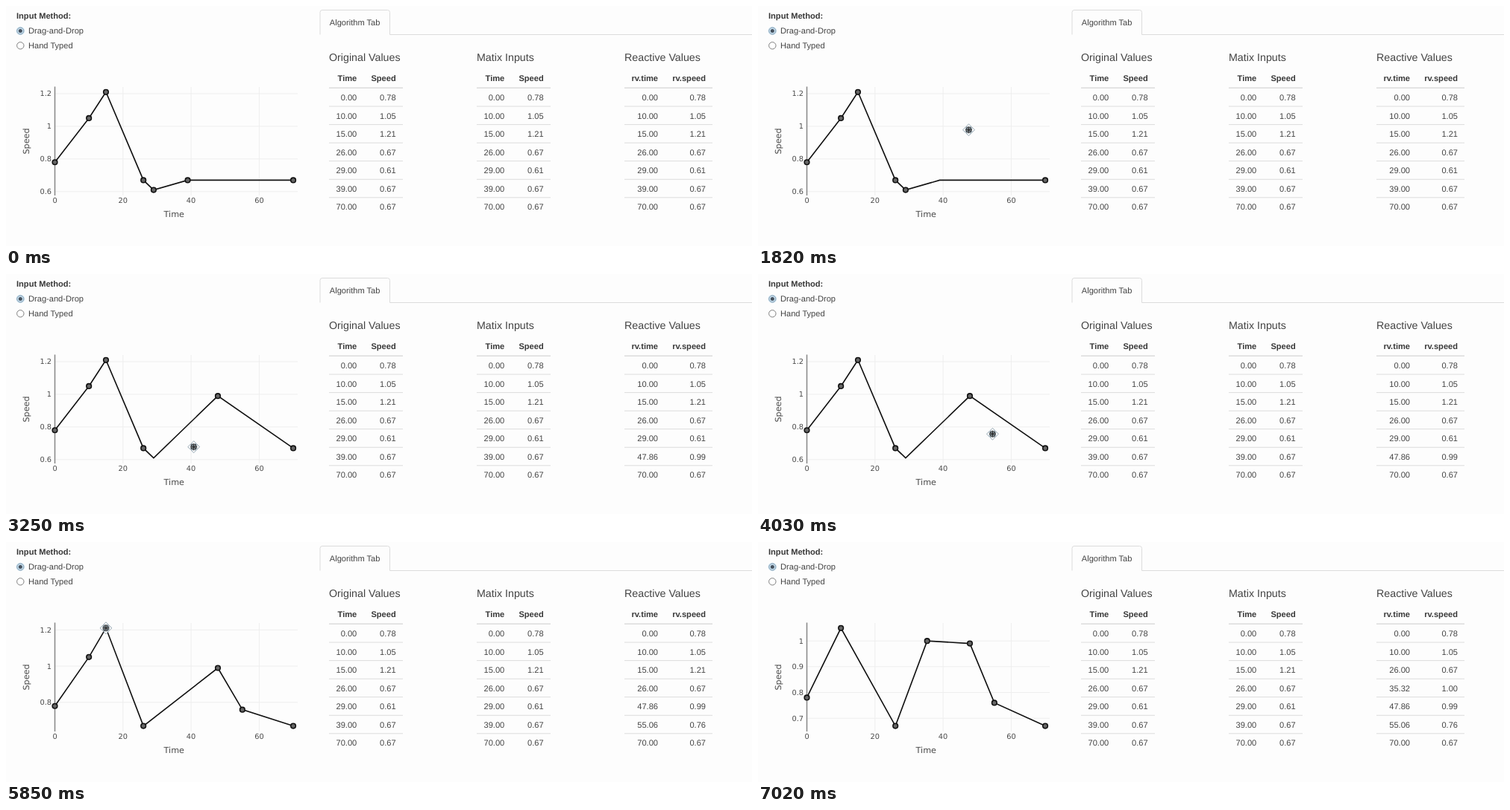
Animation, 1000 px wide and 323 px high, one loop 7930 ms. Source, as an HTML page:

```html
<!DOCTYPE html>
<html lang="en">
<head>
<meta charset="utf-8">
<title>Drag-and-drop chart</title>
<style>
  html, body { margin: 0; width: 100%; height: 100%; overflow: hidden; background: #fdfdfd; }
  svg { display: block; width: 100%; height: 100%; }
  text { font: 11.1px "Liberation Sans", Arial, sans-serif; fill: #444; text-rendering: geometricPrecision; }
  .b { font-weight: bold; fill: #383838; }
  .h { font-size: 14.25px; }
  .end { text-anchor: end; }
  .mid { text-anchor: middle; }
  .axis { font: 11.2px "DejaVu Sans", Verdana, sans-serif; fill: #4a4a4a; }
  .tick { font-size: 9.8px; }
  .rule { stroke: #dcdcdc; fill: none; }
  .grid { stroke: #eee; }
  .zero { stroke: #8c8c8c; stroke-width: 1.6; }
  .line { stroke: #111; stroke-width: 1.6; fill: none; }
  .dot { fill: #666; stroke: #111; stroke-width: 1.6; }
</style>
</head>
<body>
<svg viewBox="0 0 1000 323" id="stage"></svg>
<script>
const LOOP = 7930, STEP = 130;
const stage = document.getElementById('stage');

function add(parent, name, attrs = {}, text) {
  const node = document.createElementNS('http://www.w3.org/2000/svg', name);
  for (const key in attrs) node.setAttribute(key, attrs[key]);
  if (text !== undefined) node.textContent = text;
  parent.appendChild(node);
  return node;
}
const group = () => add(stage, 'g');
const label = (parent, x, y, text, cls = '') => add(parent, 'text', { x, y, class: cls }, text);
const rule = (parent, x1, y1, x2, y2, cls = 'rule') => add(parent, 'line', { x1, y1, x2, y2, class: cls });
const disc = (parent, cx, cy, r, fill, stroke = 'none') => add(parent, 'circle', { cx, cy, r, fill, stroke });

// Rows are [time, speed]; every drag moves one row and the rows are sorted again
const base = [[0, .78], [10, 1.05], [15, 1.21], [26, .67], [29, .61], [39, .67], [70, .67]];
const drags = [
  { from: 39, to: [47.86, .99], hover: 1170, grab: 1300, rest: 2080, drop: 2340 },
  { from: 29, to: [55.06, .76], hover: 2860, grab: 2990, rest: 4420, drop: 4940 },
  { from: 15, to: [35.32, 1], hover: 5590, grab: 5850, rest: 6500, drop: 7020 }
];
const states = [base];
for (const { from, to } of drags)
  states.push(states.at(-1).map(r => r[0] === from ? to : r).sort((a, b) => a[0] - b[0]));

// The speed axis always fits the lowest and highest row
const px = time => 65.5 + time * 4.565;
function yScale(rows) {
  const speeds = rows.map(r => r[1]);
  const lo = Math.min(...speeds), range = Math.max(...speeds) - lo;
  return { range, py: v => 247.6 - (v - lo) / range * 131.8 };
}

function drawForm() {
  const g = group();
  label(g, 14, 17.3, 'Input Method:', 'b');
  label(g, 30, 37.1, 'Drag-and-Drop');
  label(g, 30, 56.9, 'Hand Typed');
  disc(g, 19.3, 33.5, 5.8, '#d6e9f6');
  disc(g, 19.3, 33.5, 4.5, '#c9e2f3', '#8299ab');
  disc(g, 19.3, 33.5, 2.5, '#46525e');
  disc(g, 19.3, 53.3, 4.7, '#fff', '#808080');
  add(g, 'path', { d: 'M421 38.5V8.5q0-3 3-3H511.5q3 0 3 3V38.5H1000', class: 'rule' });
  label(g, 433.8, 26, 'Algorithm Tab');
}

function drawTable(x, title, heads, rights, width) {
  const g = group();
  label(g, x, 74.3, title, 'h');
  heads.forEach((h, j) => label(g, x + rights[j], 101.4, h, 'b end'));
  rule(g, x, 110.3, x + width, 110.3).setAttribute('stroke-width', 1.6);
  const cells = base.map((row, i) => {
    const y = 123 + i * 24.55;
    if (i) rule(g, x, y - 12.5, x + width, y - 12.5);
    return row.map((v, j) => label(g, x + rights[j], y + 4, '', 'end'));
  });
  const fill = rows =>
    rows.forEach((r, i) => r.forEach((v, j) => cells[i][j].textContent = v.toFixed(2)));
  fill(base);
  return fill;
}

function drawPlot(g, rows) {
  const { range, py } = yScale(rows);
  g.replaceChildren();
  for (let v = 0; v <= 60; v += 20) {
    if (v) rule(g, px(v), 109, px(v), 255, 'grid');
    label(g, px(v), 265.4, v, 'axis tick mid');
  }
  for (let k = 6; k <= 12; k += range > .5 ? 2 : 1) {
    const y = py(k / 10);
    if (y < 109 || y > 255) continue;
    rule(g, 65.5, y, 391, y, 'grid');
    label(g, 61, y + 3.5, k / 10, 'axis tick end');
  }
  rule(g, 65.5, 108.5, 65.5, 255, 'zero');
  label(g, 225.3, 284.2, 'Time', 'axis mid');
  label(g, 0, 0, 'Speed', 'axis mid').setAttribute('transform', 'translate(31.2 182) rotate(-90)');
  add(g, 'polyline', { points: rows.map(r => [px(r[0]), py(r[1])]).join(' '), class: 'line' });
  return rows.map(r => add(g, 'circle', { cx: px(r[0]), cy: py(r[1]), r: 3.3, class: 'dot' }));
}

// Four-way move pointer: white arrows with a thin outline over the held marker
function drawPointer() {
  const g = group();
  add(g, 'circle', { r: 3.3, class: 'dot' });
  for (let angle = 0; angle < 360; angle += 90)
    add(g, 'path', {
      d: 'M0-1.3H4.2V-3.6L8 0L4.2 3.6V1.3H0', transform: `rotate(${angle})`,
      fill: '#fff', stroke: '#7f95a3', 'stroke-width': .8
    });
  add(g, 'path', { d: 'M-4.5 0H4.5M0-4.5V4.5', stroke: '#222', 'stroke-width': 1.5 });
  return g;
}

function pointerAt(drag, rows, t) {
  const { py } = yScale(rows);
  const [time, speed] = rows.find(r => r[0] === drag.from);
  const u = Math.min(1, Math.max(0, (t - drag.grab) / (drag.rest - drag.grab)));
  const ease = 1 - (1 - u) ** 3;
  const mix = (a, b) => a + (b - a) * ease;
  return [mix(px(time), px(drag.to[0])), mix(py(speed), py(drag.to[1]))];
}

drawForm();
drawTable(433, 'Original Values', ['Time', 'Speed'], [37.3, 89.7], 99);
drawTable(631, 'Matix Inputs', ['Time', 'Speed'], [37.3, 89.7], 99);
const setReactive = drawTable(829, 'Reactive Values', ['rv.time', 'rv.speed'], [45, 109], 118);
const plot = group(), pointer = drawPointer();
let dots, shownPlot = -1;

function render(time) {
  const t = Math.floor(time % LOOP / STEP) * STEP;
  const dropped = at => drags.filter(d => at >= d.drop).length;
  const state = dropped(t), rows = states[state], drag = drags[state];
  if (state !== shownPlot) dots = drawPlot(plot, states[shownPlot = state]);
  setReactive(states[dropped(t + STEP)]); // the table refreshes one step before the plot

  const held = drag && t >= drag.hover;
  rows.forEach((r, i) =>
    dots[i].setAttribute('visibility', held && r[0] === drag.from ? 'hidden' : 'visible'));
  pointer.setAttribute('visibility', held ? 'visible' : 'hidden');
  if (held) pointer.setAttribute('transform', `translate(${pointerAt(drag, rows, t)})`);
}

const start = performance.now();
function tick() {
  render(performance.now() - start);
  requestAnimationFrame(tick);
}
tick();
</script>
</body>
</html>
```
